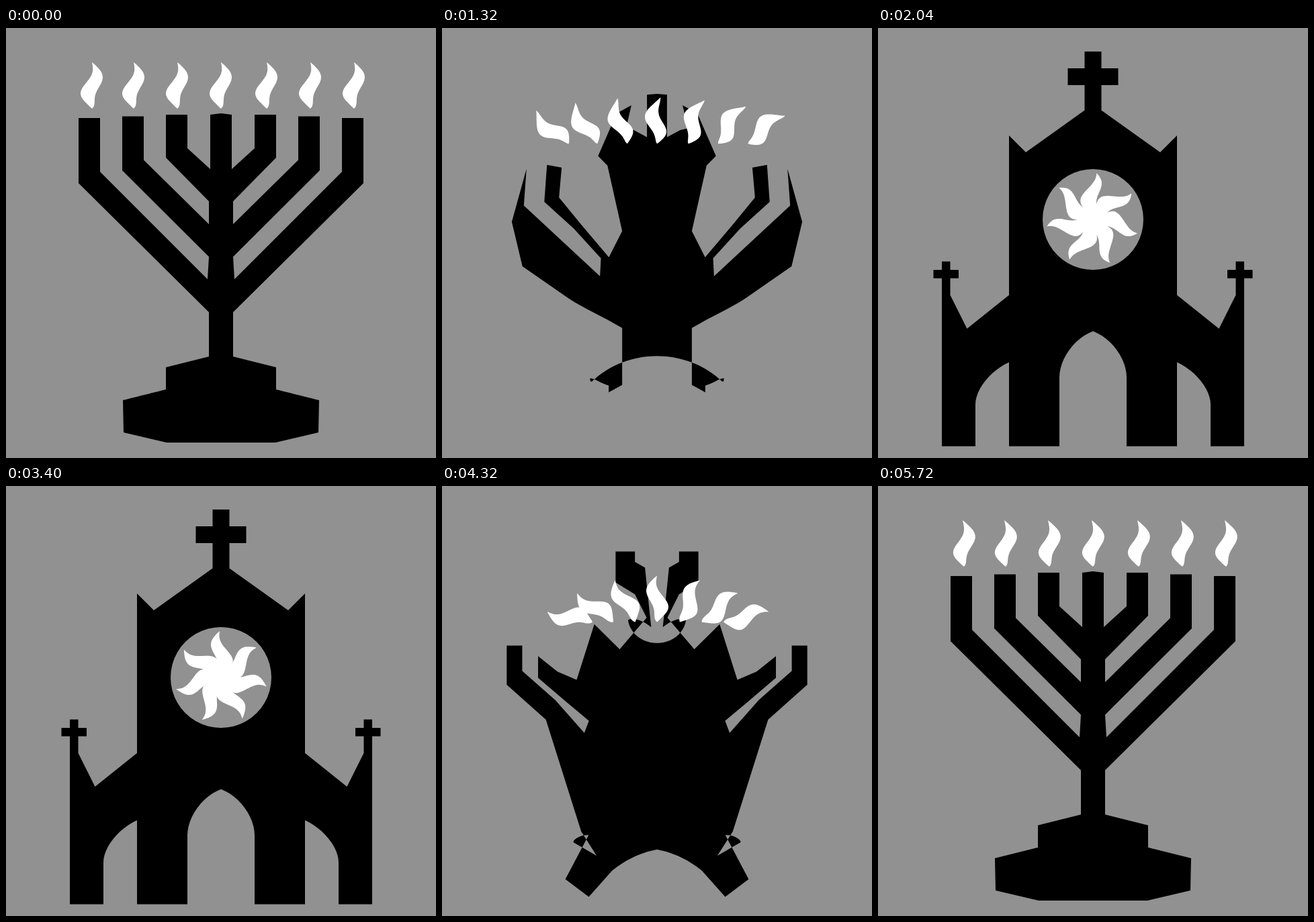
These frames come from a looping animation (640 by 640 pixels, 5.76 s). An HTML page with a canvas:

```html
<!DOCTYPE html>
<html>
<head>
<meta charset="utf-8">
<style>
html, body { margin: 0; width: 100%; height: 100%; overflow: hidden; background: #919191; }
canvas { display: block; }
</style>
</head>
<body>
<canvas id="stage" width="640" height="640"></canvas>
<script>
const ctx = document.getElementById('stage').getContext('2d');
const LOOP = 5760, STEP = 40, FLICKER = 960;
const AXIS = 320, GRID = 25, TOP = 35;

const lerp = (a, b, s) => a + (b - a) * s;
const mix = (p, q, s) => p.map((v, i) => lerp(v, q[i], s));

function smooth(t, from, to) {
  const x = Math.min(1, Math.max(0, (t - from) / (to - from)));
  return x * x * (3 - 2 * x);
}

// Both builders return the left half of an outline, from top to bottom.
function candelabrum() {
  const points = [[AXIS, 127], [304, 129]];
  for (let i = 0; i < 3; i++) {
    const x = 238 - 65 * i, top = 129 + 2.5 * i;
    const innerJoin = [304 - 2 * i, 210 + 82 * i], innerKnee = [x + 32, 179 + 17.5 * i];
    const outerJoin = [302, 258 + 82.5 * i], outerKnee = [x, 193 + 19 * i];
    points.push(
      innerJoin, mix(innerJoin, innerKnee, 0.5), innerKnee, [x + 32, top],
      [x, top], outerKnee, mix(outerKnee, outerJoin, 0.5), outerJoin
    );
  }
  for (const tier of [0, 1]) {
    const x = 302 - 64 * tier, y = 489 + 49 * tier;
    points.push([x, y], [x - 64, y + 16]);
  }
  return [...points, [175, 602], [239, 617], [AXIS, 617]];
}

// Grid position, counted left and down from the tip of the spire.
// The optional corner rounds the edge that leads to the next point.
const at = (a, b, corner) => ({ p: [AXIS - GRID * a, TOP + GRID * b], corner });
const pos = (a, b) => at(a, b).p;

const crossSide = (a, b, size, dir) =>
  [[0.5, 0], [0.5, 1], [1.5, 1], [1.5, 2], [0.5, 2]]
    .map(([x, y]) => at(a + dir * size * x, b + size * y));

const facade = [
  at(0, 0), ...crossSide(0, 0, 1, 1),
  at(0.5, 3.5), at(4, 6), at(5, 5), at(5, 14.5), at(7.5, 16.5), at(8.5, 14.5),
  ...crossSide(8.75, 12.5, 0.5, -1).reverse(), ...crossSide(8.75, 12.5, 0.5, 1),
  at(9, 23.5), at(7, 23.5), at(7, 21, pos(7, 19.4)), at(5, 18.5),
  at(5, 23.5), at(2, 23.5), at(2, 19.4, pos(2, 17.4)), at(0, 16.65)
];
const rose = [at(0, 13, pos(3, 13)), at(3, 10, pos(3, 7)), at(0, 7)];

const lamp = candelabrum();
const churchIn = [...facade, ...rose];
const churchOut = [...rose, ...facade];

const flameX = [128, 190, 255, 320, 388, 453, 518];

// Quarter of an ellipse from a to b, tangent to the lines through corner k.
function roundEdge(a, k, b, f) {
  const c = Math.cos(f * Math.PI / 2), s = Math.sin(f * Math.PI / 2);
  return a.map((v, i) => v + b[i] - k[i] + (k[i] - b[i]) * c + (k[i] - v) * s);
}

function outline(church, s) {
  return church.flatMap(({ p, corner }, i) => {
    if (!corner) return [mix(lamp[i], p, s)];
    return Array.from({ length: 12 }, (_, j) => mix(
      mix(lamp[i], lamp[i + 1], j / 12),
      roundEdge(p, corner, church[i + 1].p, j / 12),
      s
    ));
  });
}

function fill(points, color) {
  ctx.fillStyle = color;
  ctx.beginPath();
  points.forEach(([x, y]) => ctx.lineTo(x, y));
  ctx.fill();
}

// A tapered body around a centre line that sways in a rising wave.
function flamePoints(phase) {
  const left = [], right = [];
  for (let i = 0; i <= 30; i++) {
    const v = i / 30, y = 69 * (v - 1);
    const mid = 7.5 * (1 - v ** 5) * Math.sin(2 * Math.PI * (v + phase));
    const half = 12 * Math.max(0, Math.sin(Math.PI * v ** 1.2)) ** 0.8;
    left.push([mid - half, y]);
    right.unshift([mid + half, y]);
  }
  return [...left, ...right];
}

function draw(t) {
  ctx.fillStyle = '#919191';
  ctx.fillRect(0, 0, 640, 640);

  const half = t < LOOP / 2
    ? outline(churchIn, smooth(t, 960, 1920))
    : outline(churchOut, 1 - smooth(t, 3850, 4740));
  fill(half, '#000');
  fill(half.map(([x, y]) => [2 * AXIS - x, y]), '#000');

  const s = smooth(t, 960, 1920) - smooth(t, 3840, 4800);
  const flame = flamePoints(t / FLICKER);
  flameX.forEach((x, i) => {
    ctx.save();
    ctx.translate(lerp(x, AXIS, s), lerp(120, 285, s));
    ctx.rotate((i - 3) * 2 * Math.PI / 7 * s);
    fill(flame, '#fff');
    ctx.restore();
  });
}

const start = performance.now();
function tick() {
  const t = (performance.now() - start) % LOOP;
  draw(Math.floor(t / STEP) * STEP);
  requestAnimationFrame(tick);
}
tick();
</script>
</body>
</html>
```
